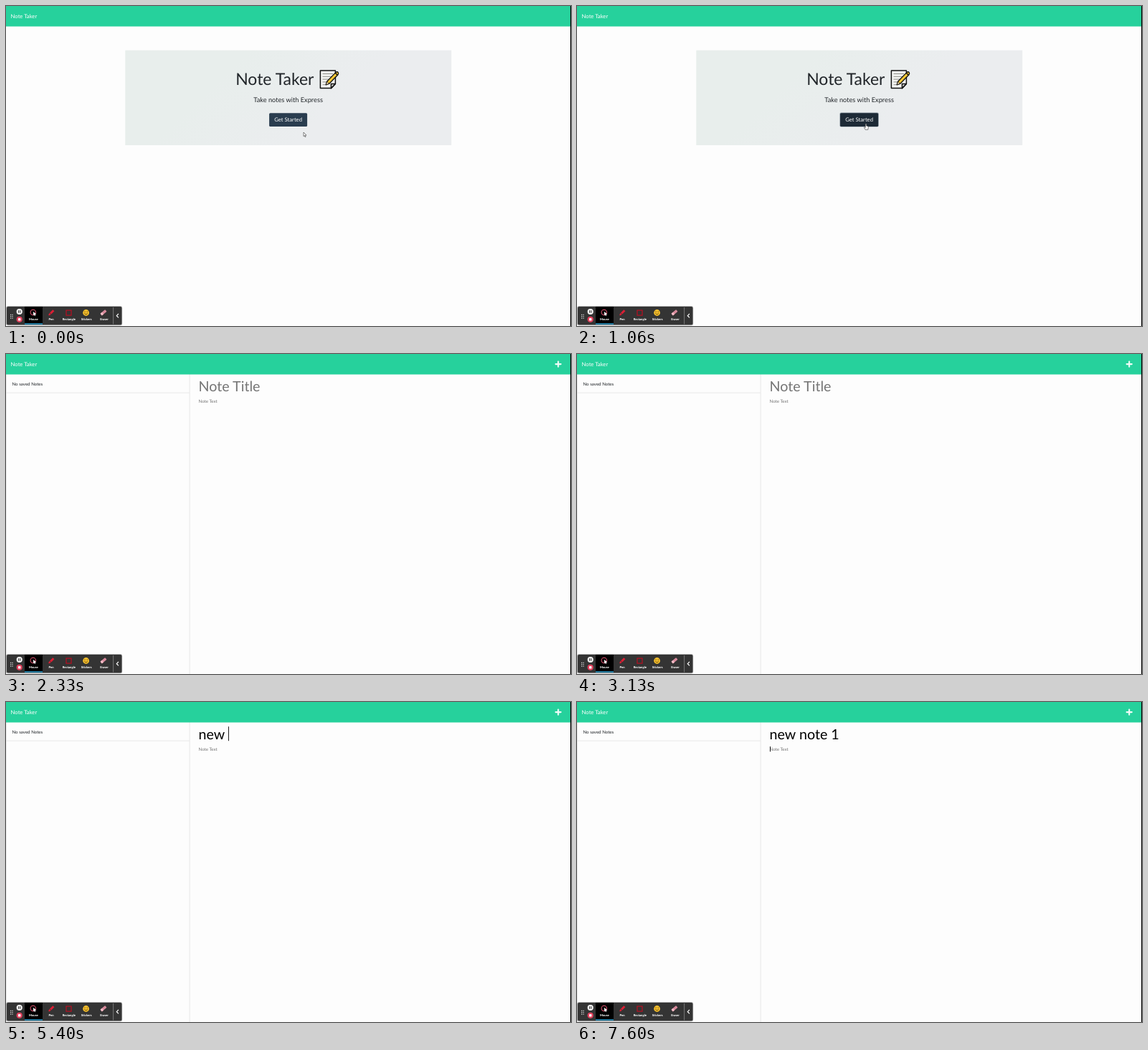
An HTML page for the animation above (8000 ms loop, 788x446 px).

```html
<!DOCTYPE html>
<html lang="en">
<head>
<meta charset="utf-8">
<title>Note Taker</title>
<style>
  html, body { margin: 0; width: 100%; height: 100%; overflow: hidden; background: #fdfdfd; }
  svg { display: block; width: 788px; height: 446px; }
  text { font-family: Lato, sans-serif; text-rendering: geometricPrecision; }

  .loop { animation: 8s step-end infinite; }
  .home { animation-name: home; }
  .notes { animation-name: notes; }
  .loaded { animation-name: loaded; }
  .labels { animation-name: labels; font-weight: 800; font-size: 4.15px; fill: #fff; text-anchor: middle; }
  .button { animation-name: hover; }
  .ring { animation-name: ring; }
  .arrow { animation-name: arrow; }
  .hand { animation-name: hand; }
  .pointer { animation: travel 8s ease-in-out infinite; }

  @keyframes home { 0% { visibility: visible } 14%, 100% { visibility: hidden } }
  @keyframes notes { 0% { visibility: hidden } 14%, 100% { visibility: visible } }
  @keyframes loaded { 0% { visibility: hidden } 15%, 100% { visibility: visible } }
  @keyframes labels { 0% { visibility: visible } 14% { visibility: hidden } 15%, 100% { visibility: visible } }
  @keyframes hover { 0% { fill: #2a3d4f } 8.25%, 100% { fill: #1d2a36 } }
  @keyframes ring { 0% { visibility: hidden } 11.6% { visibility: visible } 14%, 100% { visibility: hidden } }
  @keyframes arrow { 0% { visibility: visible } 8.25%, 100% { visibility: hidden } }
  @keyframes hand { 0% { visibility: hidden } 8.25% { visibility: visible } 14%, 100% { visibility: hidden } }
  @keyframes travel {
    0%, 2% { transform: translate(415px, 176px) }
    10.5%, 100% { transform: translate(403px, 164px) }
  }
</style>
</head>
<body>
<svg viewBox="0 0 788 446">
  <defs>
    <linearGradient id="panel" x1="0" y1="0" x2="1" y2=".3">
      <stop offset=".35" stop-color="#e8eeec"/>
      <stop offset=".75" stop-color="#ebedef"/>
    </linearGradient>
  </defs>
  <rect width="788" height="446" fill="#fdfdfd"/>

  <g class="loop home">
    <rect x="166.3" y="61.7" width="454.9" height="132.3" fill="url(#panel)"/>
    <g fill="#212529">
      <text x="320.2" y="110.4" font-size="22.96">Note Taker</text>
      <text x="393.6" y="133.8" font-size="9.22" text-anchor="middle">Take notes with Express</text>
    </g>
    <!-- memo emoji -->
    <g stroke="#111" stroke-width="1.5" stroke-linejoin="round">
      <path d="M438.4 89.9H459.4V108.5L453.4 114.6H438.4Z" fill="#f4f4f2"/>
      <path d="M453.4 114.6V108.5H459.4Z" fill="#d5d5d3"/>
      <path d="M441.5 94.5H456M441.5 98.3H455M441.5 102.1H452M441.5 105.9H447M441.5 109.7H446" stroke="#8d8d88" stroke-width="1"/>
      <path d="M446.2 109.8L447.6 105.2L459.8 92.6Q462 91 463.2 92.6Q464.4 94.2 463 95.8L450.8 108.2Z" fill="#f5c633" stroke-width="1.3"/>
      <path d="M459.2 93.2L462.4 96.3" stroke-width="1.6"/>
      <path d="M446.2 109.8L447.6 105.2L450.8 108.2Z" fill="#f7dfb0" stroke-width=".8"/>
    </g>
  </g>
  <rect class="loop ring" x="366.4" y="148.6" width="54.4" height="20" rx="2" fill="#8f9ba6"/>
  <g class="loop home">
    <rect class="loop button" x="367.1" y="149.3" width="53" height="18.6" rx="1.5"/>
    <text x="393.6" y="161.3" font-size="7.69" text-anchor="middle" fill="#fff">Get Started</text>
  </g>

  <g class="loop notes">
    <path d="M.4 28V446M256.1 28V446" stroke="#e2e2e2" stroke-width=".8"/>
    <text id="title" x="268.6" y="51.6" font-size="19.68"></text>
    <text x="268.6" y="67.6" font-size="6.15" fill="#757575">Note Text</text>
    <rect id="caret" width=".9" fill="#000"/>
  </g>

  <rect width="788" height="28.5" fill="#26d19c"/>
  <text x="6.6" y="17" font-size="7.69" fill="#fff">Note Taker</text>
  <g class="loop loaded">
    <text x="8.5" y="43.8" font-size="6.15" fill="#212529">No saved Notes</text>
    <path d="M0 54.1H256" stroke="#e2e2e2" stroke-width=".8"/>
    <path d="M766.6 14.1H773.8M770.2 10.5V17.7" stroke="#f0fcf8" stroke-width="2.1" stroke-linecap="round"/>
  </g>
  <rect x="787" width="1" height="446" fill="#000"/>

  <!-- recorder toolbar -->
  <rect x=".3" y="418.2" width="161.8" height="27" rx="2.5" fill="#000" opacity=".35"/>
  <rect x="1" y="419" width="160.4" height="25.3" rx="2" fill="#343434"/>
  <path d="M6.6 429.7V436M9 429.7V436" stroke="#ddd" stroke-width="1.2" stroke-dasharray="1.2 1.2"/>
  <circle cx="18.7" cy="426" r="4.1" fill="#f4f4f4"/>
  <path d="M17.6 424.2V427.8M19.8 424.2V427.8" stroke="#333" stroke-width="1.1"/>
  <circle cx="18.7" cy="436.8" r="4.1" fill="#e0405c"/>
  <rect x="17" y="435.1" width="3.4" height="3.4" rx=".6" fill="#fff"/>
  <rect x="26" y="419" width="25" height="24" fill="#000"/>
  <rect x="26" y="442.3" width="25" height="1.5" fill="#279fd0"/>
  <circle cx="37.8" cy="427" r="3.7" fill="none" stroke="#e0536f" stroke-width="1.1"/>
  <path d="M38 426L42.2 429.6L40.5 429.9L41.2 431.6L40.1 432L39.4 430.3L38.2 431.4Z" fill="#fff"/>
  <g transform="translate(63 427.6) rotate(45)" fill="#dc1f35">
    <rect x="-1.5" y="-4.8" width="3" height="6"/>
    <path d="M-1.5 1.8H1.5L.6 4.8H-.6Z"/>
  </g>
  <rect x="84" y="424.1" width="7" height="7" fill="none" stroke="#b90f22" stroke-width="1.2"/>
  <circle cx="111.6" cy="427.5" r="4.4" fill="#f6c02c"/>
  <path d="M109.3 426.2H110.7M112.6 426.2H114M109.3 428.6Q111.6 431.2 113.9 428.6" fill="none" stroke="#5b3a0c" stroke-width=".9"/>
  <g transform="translate(136 427.3) rotate(-40)">
    <rect x="-4.4" y="-1.8" width="8.8" height="3.6" rx=".7" fill="#d98a9c"/>
    <rect x="-4.4" y="-1.8" width="3.2" height="3.6" rx=".7" fill="#f3bcc6"/>
  </g>
  <g class="loop labels">
    <text x="38.4" y="438.3">Mouse</text>
    <text x="63" y="438.3">Pen</text>
    <text x="87.8" y="438.3">Rectangle</text>
    <text x="112.2" y="438.3">Stickers</text>
    <text x="137" y="438.3">Eraser</text>
  </g>
  <path d="M149.6 420V443.5" stroke="#8a8a8a" stroke-width=".8"/>
  <path d="M156.9 429L154.3 431.7L156.9 434.4" fill="none" stroke="#fff" stroke-width="1.2"/>

  <g class="pointer" fill="#fff" stroke="#333" stroke-width=".6" stroke-linejoin="round">
    <path class="loop arrow" d="M0 0V5.6L1.3 4.5L2.2 6.6L3.1 6.2L2.2 4.2L4 4.1Z"/>
    <path class="loop hand" d="M-.7 .6Q0 -.4 .7 .6V3L3 3.7Q3.5 4 3.3 5L2.8 8.4H-.8L-2.6 5.4Q-2.4 4.4 -.7 5.6Z"/>
  </g>
</svg>
<script>
  const title = document.getElementById('title');
  const caret = document.getElementById('caret');
  const LOOP = 8000, BLINK = 533;
  const FOCUS = 2595, TAB = 7595;
  const typed = 'new note 1';
  const keyTimes = [4995, 5125, 5195, 5325, 5855, 5925, 5995, 6055, 6225, 6465];

  function setTitle(text) {
    const shown = (text || 'Note Title').replace(/ /g, '\u00a0');
    if (title.textContent !== shown) title.textContent = shown;
    title.setAttribute('fill', text ? '#000' : '#757575');
  }

  function placeCaret(x, y, height) {
    caret.setAttribute('x', x);
    caret.setAttribute('y', y);
    caret.setAttribute('height', height);
  }

  function draw(t) {
    const count = keyTimes.filter(k => k <= t).length;
    setTitle(typed.slice(0, count));

    // each key press or focus change restarts the blink
    const since = t >= TAB ? TAB : count ? keyTimes[count - 1] : FOCUS;
    const on = t >= FOCUS && Math.floor((t - since) / BLINK) % 2 === 0;
    caret.setAttribute('opacity', on ? 1 : 0);

    if (t >= TAB) placeCaret(269, 62, 7.2);
    else placeCaret(268.6 + (count ? title.getComputedTextLength() : 0.4), 34.2, 20);
  }

  const start = performance.now();
  function tick() {
    draw((performance.now() - start) % LOOP);
    requestAnimationFrame(tick);
  }
  tick();
</script>
</body>
</html>
```
